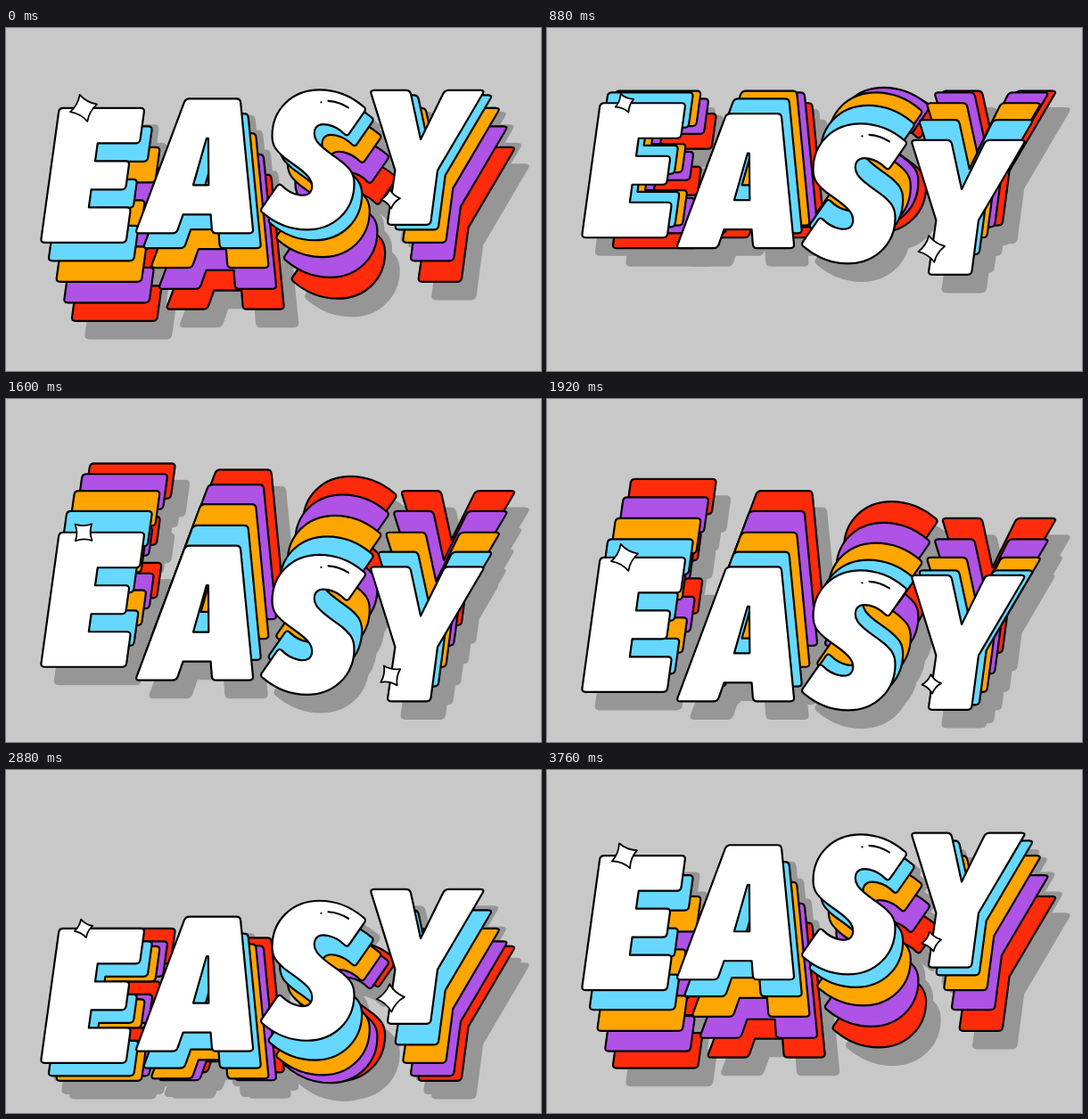
An HTML page that plays this animation: 600x385 px, repeating every 3.84 s.

```html
<!DOCTYPE html>
<html lang="en">
<head>
<meta charset="utf-8">
<title>Easy</title>
<style>
  html, body { margin: 0; width: 100%; height: 100%; overflow: hidden; background: #c8c8c8; }
  svg { display: block; width: 100vw; height: 100vh; }
  path { stroke: #000; stroke-width: 2.2; stroke-linejoin: round; stroke-linecap: round; fill-rule: evenodd; }
  #shadow path { fill: #969696; stroke: #969696; }
  .shine { fill: none; }
  .star { fill: #fff; stroke-width: 1.8; vector-effect: non-scaling-stroke; }
</style>
</head>
<body>
<svg viewBox="0 0 600 385" role="img" aria-label="EASY">
  <g id="shadow" transform="translate(15.5 19.5)"></g>
  <g id="word"></g>
  <g id="stars"></g>
</svg>
<script>
const LOOP = 3840, STEP = 80;
const TOP = 145.4, TRAVEL = 128;                   // highest letter centre, drop
const LETTER_LAG = 160, DEPTH_LAG = 240, SHIFT = 8.65;
const SLANT = .138, CAP = 75.5;                    // italic slope, half cap height
const COLORS = ['#fff', '#66d8ff', '#ffa500', '#af52e6', '#ff2b0a'];

// Completes a half outline by reflecting it back to its start.
const mirror = (half, sx, sy) =>
  [...half, ...half.map(([x, y]) => [x * sx, y * sy]).reverse()];

// Slanted polygon path with rounded convex corners (points run clockwise).
function outline(points, r = 4.5) {
  const pts = points.map(([x, y]) => [x - SLANT * y, y]), n = pts.length;
  const toward = ([x, y], [u, v]) => {
    const k = r / Math.hypot(u - x, v - y);
    return [x + (u - x) * k, y + (v - y) * k];
  };
  return pts.map((p, i) => {
    const a = pts[(i + n - 1) % n], b = pts[(i + 1) % n];
    const turn = (p[0] - a[0]) * (b[1] - p[1]) - (p[1] - a[1]) * (b[0] - p[0]);
    const cmd = i ? 'L' : 'M';
    return turn > 0 ? `${cmd}${toward(p, a)}Q${p} ${toward(p, b)}` : cmd + p;
  }).join('') + 'Z';
}

function letterE() {
  const stem = 48.5, arm = 95.7, bar = 87;
  return outline(mirror(
    [[0, -CAP], [arm, -CAP], [arm, -36], [stem, -36], [stem, -16], [bar, -16]], 1, -1));
}

function letterA() {
  const body = mirror([[30.7, -CAP], [66.2, CAP], [20, CAP], [15.5, 54.5]], -1, 1);
  const hole = mirror([[1, -31], [8.7, 21.5]], -1, 1);
  return outline(body) + outline(hole, .3);
}

// The S is its own half turn: one relative stroke, then the same negated.
function letterS() {
  const half = 'c-13 -11 -30 -18.5 -49 -18.5c-31 0 -53 22.5 -53 51.5c0 12 5 17 13 24' +
    'c11 9 23 15 29 24c4 6 3 12 1 15c-5 7 -21 4 -32 -7q-3 -3 -5.5 .5l-17 24.5q-2.5 3.5 1.5 6';
  return 'M56 -60' + half + half.replace(/-?[\d.]+/g, n => -n) + 'Z';
}

function letterY() {
  const side = [[19.5, -CAP], [64.3, -CAP], [23.8, 14.5], [24.2, CAP]];
  return outline([...mirror(side, -1, 1), [0, -20.5]]);
}

const letters = [
  { x: 49.3, d: letterE() },
  { x: 221.6, d: letterA() },
  { x: 344.5, d: letterS(), shine: 'M9-64.5h.01M17-66Q29.5-65 39.5-58.5' },
  { x: 462.2, d: letterY() }
];
const LAST = letters.length - 1;
const stars = [
  { x: 87, y: -CAP, letter: 0, turn: -16, grow: 2.9 },
  { x: 431.3, y: 46.5, letter: LAST, turn: -4, grow: -2.9 }
];
const STAR = 'M0-1Q.32-.32 1 0Q.32.32 0 1Q-.32.32-1 0Q-.32-.32 0-1Z';

function add(id, d, attrs = {}) {
  const el = document.createElementNS('http://www.w3.org/2000/svg', 'path');
  el.setAttribute('d', d);
  for (const key in attrs) el.setAttribute(key, attrs[key]);
  return document.getElementById(id).appendChild(el);
}

const layers = [];
letters.forEach(({ x, d, shine }, letter) => {
  for (let depth = COLORS.length - 1; depth >= 0; depth--) {
    const els = [add('shadow', d), add('word', d, { fill: COLORS[depth] })];
    if (shine && !depth) els.push(add('word', shine, { class: 'shine' }));
    layers.push({ x: x + depth * SHIFT, letter, depth, els });
  }
});
stars.forEach(s => s.el = add('stars', STAR, { class: 'star' }));

// Eased there-and-back swing, 0 at t = 0 and 1 at half the period.
function swing(t, period) {
  const u = ((t / period) % 1 + 1) % 1;
  const v = u < .5 ? 2 * u : 2 - 2 * u;
  return v * v * (3 - 2 * v);
}

const height = (t, letter, depth = 0) =>
  TOP + TRAVEL * swing(t - (LAST - letter) * LETTER_LAG - depth * DEPTH_LAG, LOOP);

function draw() {
  const t = Math.floor(performance.now() / STEP) * STEP % LOOP;
  for (const { x, letter, depth, els } of layers) {
    const move = `translate(${x} ${height(t, letter, depth)})`;
    els.forEach(el => el.setAttribute('transform', move));
  }
  for (const { x, y, letter, turn, grow, el } of stars) {
    const size = 13.2 + grow * (1 - 2 * swing(t - LETTER_LAG, LOOP / 2));
    el.setAttribute('transform', `translate(${x} ${height(t, letter) + y}) ` +
      `rotate(${turn + 360 * t / LOOP}) scale(${size})`);
  }
  requestAnimationFrame(draw);
}
draw();
</script>
</body>
</html>
```
